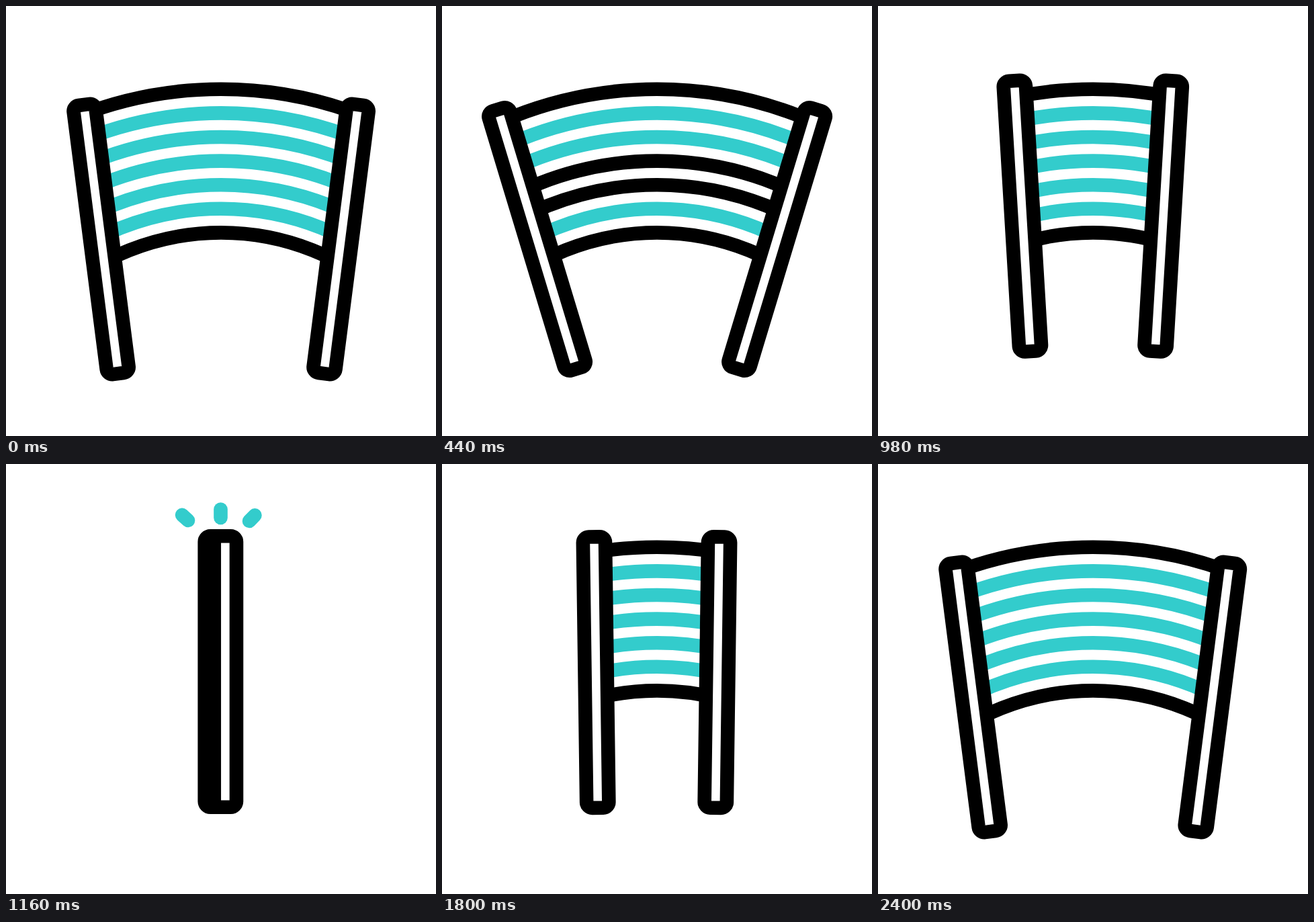
An HTML page that plays this animation: 640x640 px, repeating every 3600 ms.

```html
<!DOCTYPE html>
<html lang="en">
<head>
<meta charset="utf-8">
<title>Resistance band</title>
<style>
  html, body { margin: 0; width: 100%; height: 100%; overflow: hidden; background: #fff; }
  svg { display: block; width: 100%; height: 100%; }
</style>
</head>
<body>
<svg viewBox="0 0 640 640">
  <defs>
    <clipPath id="between"><polygon id="gap"/></clipPath>
  </defs>
  <g id="cloth" clip-path="url(#between)" fill="none" stroke-width="20.6"></g>
  <g id="sparks" stroke="#33cccc" stroke-width="20.6" stroke-linecap="round"></g>
  <g id="sticks" fill="#fff" stroke="#000" stroke-width="20.6"></g>
</svg>
<script>
const LOOP = 3600, STEP = 20, END = 2400;
const TEAL = '#33cccc', BLACK = '#000';
const $ = id => document.getElementById(id);

function add(parent, tag, attrs) {
  const el = document.createElementNS('http://www.w3.org/2000/svg', tag);
  set(el, attrs);
  parent.appendChild(el);
  return el;
}
function set(el, attrs) {
  for (const k in attrs) el.setAttribute(k, attrs[k]);
}

const lerp = (a, b, u) => a + (b - a) * u;
const span = (t, a, b) => Math.min(1, Math.max(0, (t - a) / (b - a)));
const easeOut = (u, p) => 1 - Math.pow(1 - u, p);
const easeInOut = (u, p) => u < 0.5
  ? Math.pow(2 * u, p) / 2
  : 1 - Math.pow(2 - 2 * u, p) / 2;

// Piecewise linear track of [time, value] pairs
function track(t, keys) {
  for (let i = 1; i < keys.length; i++) {
    const [t0, v0] = keys[i - 1], [t1, v1] = keys[i];
    if (t <= t1) return lerp(v0, v1, span(t, t0, t1));
  }
  return keys[keys.length - 1][1];
}

const REST = { left: 141.6, right: 498.6, y: 347, shut: 319.3, shutY: 309 };
const TILT = [[0, 7.3], [480, 17.7], [1100, 0], [1728, 0], [END, 7.3]];
const RISE = [[520, REST.y], [980, 312.6], [1080, 304.5], [1160, REST.shutY]];

// Concentric bands, the first and last are the black hems
const bands = Array.from({ length: 7 }, (_, k) =>
  add($('cloth'), 'circle', { cx: 320, cy: 707, r: 583.2 - 35.6 * k }));

const rods = [0, 1].map(() => add($('sticks'), 'rect',
  { x: -16.6, y: -201.7, width: 33.2, height: 403.4, rx: 8.5 }));

// Each spark runs from an inner point to an outer point
const sparks = [
  [271, 84, 237.3, 53.2],
  [319.5, 80, 319.5, 32.8],
  [362, 85, 393.8, 52.4]
].map(path => ({ path, el: add($('sparks'), 'line', {}) }));

function stickX(t, side) {
  if (t < 1620) {
    return lerp(REST[side], REST.shut, Math.pow(span(t, 480, 1170), 2.75));
  }
  const rest = side === 'left' ? REST.left : REST.right - 0.8;
  return lerp(REST.shut, rest, easeOut(span(t, 1620, END), 2.7));
}

function stickY(t) {
  return t < 1640
    ? track(t, [[0, REST.y], ...RISE])
    : lerp(REST.shutY, REST.y, easeInOut(span(t, 1640, END), 3.3));
}

function bandColor(t, k) {
  if (k === 0 || k === 6) return BLACK;
  const on = 80 + 110 * (k - 1);
  return t >= on && t < on + 220 ? BLACK : TEAL;
}

function drawSparks(t) {
  const head = easeOut(span(t, 1120, 1400), 2);
  const tail = easeOut(span(t, 1240, 1640), 2);
  $('sparks').style.display = t > 1120 && t < 1640 ? '' : 'none';
  for (const { path: [x0, y0, x1, y1], el } of sparks) {
    set(el, {
      x1: lerp(x0, x1, tail), y1: lerp(y0, y1, tail),
      x2: lerp(x0, x1, head), y2: lerp(y0, y1, head)
    });
  }
}

function draw(t) {
  const xl = stickX(t, 'left'), xr = stickX(t, 'right');
  const y = stickY(t), tilt = track(t, TILT);

  set(rods[0], { transform: `translate(${xl} ${y}) rotate(${-tilt})` });
  set(rods[1], { transform: `translate(${xr} ${y}) rotate(${tilt})` });

  const a = tilt * Math.PI / 180;
  const dx = 300 * Math.sin(a), dy = 300 * Math.cos(a);
  set($('gap'), {
    points: [xl - dx, y - dy, xr + dx, y - dy, xr - dx, y + dy, xl + dx, y + dy].join(' ')
  });

  bands.forEach((band, k) => set(band, { stroke: bandColor(t, k) }));
  drawSparks(t);
}

const start = performance.now();
function tick() {
  const t = (performance.now() - start) % LOOP;
  draw(Math.min(END, Math.floor(t / STEP) * STEP));
  requestAnimationFrame(tick);
}
tick();
</script>
</body>
</html>
```
